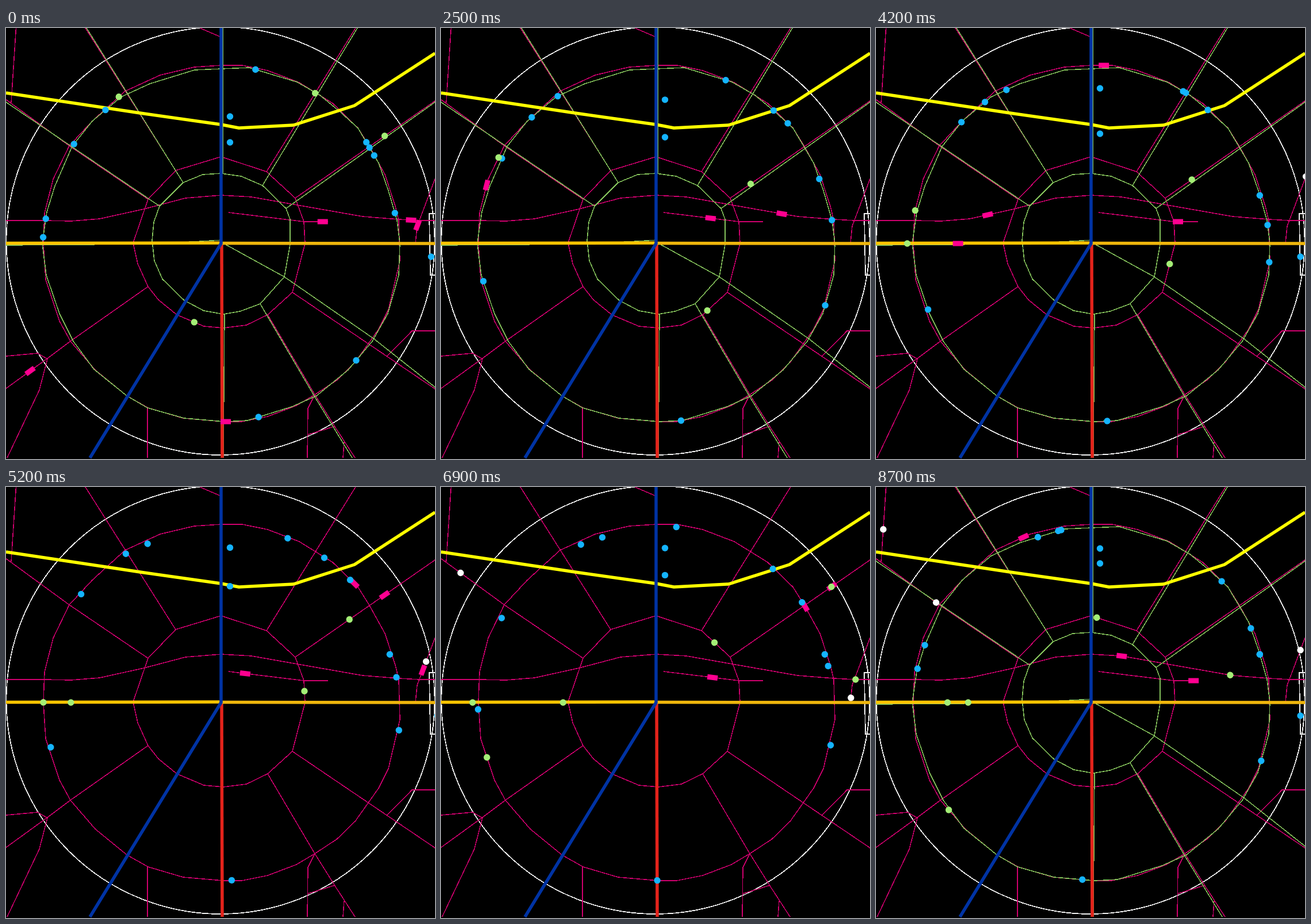
An HTML page that plays this animation: 746 px wide and 750 px high, repeating every 8.75 s.

```html
<!DOCTYPE html>
<html lang="en">
<head>
<meta charset="utf-8">
<title>Ring city traffic</title>
<style>
  html, body { margin: 0; width: 100%; height: 100%; overflow: hidden; background: #000; }
  svg { display: block; width: 100%; height: 100%; }
  .net { fill: none; stroke-width: 1.5; shape-rendering: crispEdges; }
  .road { stroke: #d0006e; }
  .plan { stroke: #86c45c; }
  .wall { stroke: #f4f4f4; stroke-width: 1.7; }
  .line { fill: none; stroke-width: 5.5; stroke-linejoin: round; }
  .car { fill: #ff0090; }
  .blue { fill: #14b4ff; }
  .green { fill: #a4ee76; }
  .white { fill: #fff; }
</style>
</head>
<body>
<svg viewBox="0 0 746 750" preserveAspectRatio="none">
  <defs><path id="axis" d="M-10 375H221"/></defs>
  <g class="net wall">
    <circle cx="373" cy="370.5" r="372.5"/>
    <path d="M746 323H736L738 430H746"/>
  </g>
  <g class="net road">
    <polygon id="outer" points="327,68 374,65 411,65 455,74 510,95 568,131 612,174 632,206 659,255 677,310 683,335 685,405 665,490 648,524 607,582 575,613 537,638 505,657 455,676 410,685 378,685 308,679 247,661 210,640 155,595 112,545 93,510 69,438 65,375 67,322 82,263 110,205 150,162 207,110 268,82"/>
    <polygon id="inner" points="374,224 453,250 503,296 518,337 520,375 498,460 455,499 418,517 378,522 344,519 297,499 265,473 247,450 229,410 221,374 247,298 295,248"/>
    <!-- lines that also serve as routes, running inwards from off stage -->
    <path id="nne" d="M614 -10L453 250"/>
    <path id="ne" d="M756 120L503 296"/>
    <path id="nw" d="M-9 118L110 205 247 298"/>
    <path id="sw" d="M-12 636L72 575 112 545 247 450"/>
    <path id="edge" d="M18 -8L9 130"/>
    <path id="side" d="M750 252L715 345 712 375"/>
    <path id="mid" d="M756 335H720L683 333 620 328 506 308 427 294 374 291 312 296 240 315 163 332 113 336 67 335H-10"/>
    <path id="short" d="M387 321L518 337H560"/>
    <path d="M138 0L295 248M746 628L498 460M455 499L537 638 572 694 607 748
      M0 571L55 566 72 576 58 630 2 748M246 661V748M537 638L525 662 524 748M524 708L572 693
      M588 720L586 748M662 572L706 527H746M337 0L372 15"/>
  </g>
  <g class="net plan" id="plan">
    <polygon id="track" points="328,73 423,69 506,94 546,117 580,145 612,174 648,235 665,283 680,335 685,375 683,430 664,497 637,545 595,595 540,640 497,659 420,683 380,685 310,679 246,661 210,640 153,594 117,545 93,497 70,430 63,375 71,320 85,275 115,206 150,162 200,120 250,97"/>
    <polygon points="374,253 409,258 446,274 487,314 494,333 494,377 484,433 442,480 407,493 378,498 344,492 310,474 272,437 258,405 254,370 257,338 267,310 308,269 342,255"/>
    <path d="M140 0L308 269M611 0L446 274M746 129L487 314M0 129L267 310M375 373L484 433 640 541 746 625
      M442 480L537 642 602 748M380 498L378 748M305 373L375 369M377 0V253M0 378L250 376"/>
  </g>
  <g class="line">
    <path stroke="#ff0" d="M0 113L240 149 374 168 405 174 500 169 606 135 746 44"/>
    <path stroke="#e4231b" d="M375 375L376 748"/>
    <path stroke="#ffc400" d="M0 374.5L375 374"/>
    <path stroke="#efb60c" d="M375 374.5L746 375"/>
    <path stroke="#0033a4" d="M374 0V375L146 748"/>
  </g>
  <g id="cars"></g>
  <g id="dots"></g>
</svg>
<script>
// Times are in seconds, speeds in pixels per second.
const LOOP = 8.75, STEP = 0.05, MID = 4.2, END = 8.7;
const SPEED = { car: 238, green: 58.5, white: 48.5 };
const CX = 375, CY = 375;
const $ = id => document.getElementById(id);
const actors = [];

// A mover maps a time to [x, y, angle], or to null while away.
function add(kind, mover) {
  const car = kind === 'car';
  const el = document.createElementNS('http://www.w3.org/2000/svg', car ? 'rect' : 'circle');
  const size = car ? { x: -9, y: -4.5, width: 18, height: 9 } : { r: 5.7 };
  for (const name in size) el.setAttribute(name, size[name]);
  el.setAttribute('class', kind);
  $(car ? 'cars' : 'dots').append(el);
  actors.push({ el, mover });
}

// Runs a route at the speed of its kind, being at its outer end at `zero`.
// trips: 1 one way, 2 there and back, Infinity to and fro; dir -1 runs outwards.
function ride(kind, id, zero, trips = 2, dir = 1) {
  const route = $(id), len = route.getTotalLength();
  add(kind, t => {
    const run = dir * SPEED[kind] * (t - zero);
    if (run < 0 || run > len * trips) return null;
    const s = len - Math.abs(len - run % (2 * len));
    const a = route.getPointAtLength(s - 1), b = route.getPointAtLength(s + 1);
    return [(a.x + b.x) / 2, (a.y + b.y) / 2, Math.atan2(b.y - a.y, b.x - a.x)];
  });
}

// Point of a ring polygon at a bearing (degrees clockwise from the top).
function ringPoint(ring, deg) {
  const a = deg * Math.PI / 180, dx = Math.sin(a), dy = -Math.cos(a);
  for (let i = 0; i < ring.length; i++) {
    const [x1, y1] = ring[i], [x2, y2] = ring[(i + 1) % ring.length];
    const ex = x2 - x1, ey = y2 - y1, px = x1 - CX, py = y1 - CY;
    const det = ex * dy - ey * dx;
    const u = (py * dx - px * dy) / det, r = (ex * py - ey * px) / det;
    if (u >= 0 && u <= 1 && r > 0) return [CX + dx * r, CY + dy * r];
  }
  return [CX, CY];
}

function circle(kind, id, bearing) {
  const ring = $(id).getAttribute('points').split(' ').map(p => p.split(',').map(Number));
  add(kind, t => {
    const b = bearing(t);
    const [x0, y0] = ringPoint(ring, b - 1), [x1, y1] = ringPoint(ring, b + 1);
    return [...ringPoint(ring, b), Math.atan2(y1 - y0, x1 - x0)];
  });
}

// Drifts evenly from a to b, then on to c.
const drift = (a, b, c) => t => t < MID
  ? a + (b - a) * t / MID
  : b + (c - b) * Math.min(1, (t - MID) / (END - MID));

// Cars; the one on the ring turns back due east.
circle('car', 'outer', t => 450 - Math.abs(271.3 - 44.1 * t));
ride('car', 'short', -0.77, Infinity);
ride('car', 'sw', 0.28, 1, -1);
ride('car', 'mid', 0.217, 1, -1);
ride('car', 'side', 0.41, 1, -1);
ride('car', 'mid', 1.81, 1);
ride('car', 'axis', 2.9);
ride('car', 'ne', 4.7);
ride('car', 'side', 4.9);
ride('car', 'mid', 7.305, 1);

// Ring traffic
circle('blue', 'track', drift(11, 31, -10));
circle('blue', 'track', drift(55, 32, 47));
circle('blue', 'track', drift(57, 41, 65));
circle('blue', 'track', drift(60, 74, 74));
circle('blue', 'track', drift(80, 84, 74));
circle('blue', 'track', drift(131, 96, 109));
circle('blue', 'track', drift(168, 175, 183));
circle('blue', 'track', drift(272, 248, 281));
circle('blue', 'track', drift(278, 313, 289));
circle('blue', 'track', drift(304, 323, 342));
circle('blue', 'track', drift(319, 331, 349));

// A pair on the north line and one peeping in from the east
for (const y of [drift(154, 105, 107), drift(199, 184, 133)]) add('blue', t => [389.5, y(t), 0]);
add('blue', t => [753 - 15 * Math.cos((t - MID) / (END - MID) * 2 * Math.PI), 398, 0]);

// Walkers
circle('green', 'inner', t => 199.2 - 22.5 * t);
circle('green', 'outer', t => 325 - 10.57 * t);
ride('green', 'ne', -2.03);
ride('green', 'nne', 2.48, 1, -1);
ride('green', 'axis', 3.1);
ride('green', 'axis', 5.79);
ride('green', 'mid', 6.3, 1);
ride('white', 'side', 4.06);
ride('white', 'nw', 5.8);
ride('white', 'edge', 7.01);

function draw(step) {
  const t = step * STEP;
  $('plan').style.display = (step + 2) % 16 < 8 ? '' : 'none';
  for (const { el, mover } of actors) {
    const pose = mover(t);
    el.style.display = pose ? '' : 'none';
    if (!pose) continue;
    const [x, y, angle] = pose;
    el.setAttribute('transform', `translate(${x.toFixed(2)} ${y.toFixed(2)}) rotate(${(angle * 180 / Math.PI).toFixed(1)})`);
  }
}

const start = performance.now();
function tick() {
  draw(Math.floor((performance.now() - start) / 1000 % LOOP / STEP));
  requestAnimationFrame(tick);
}
tick();
</script>
</body>
</html>
```
